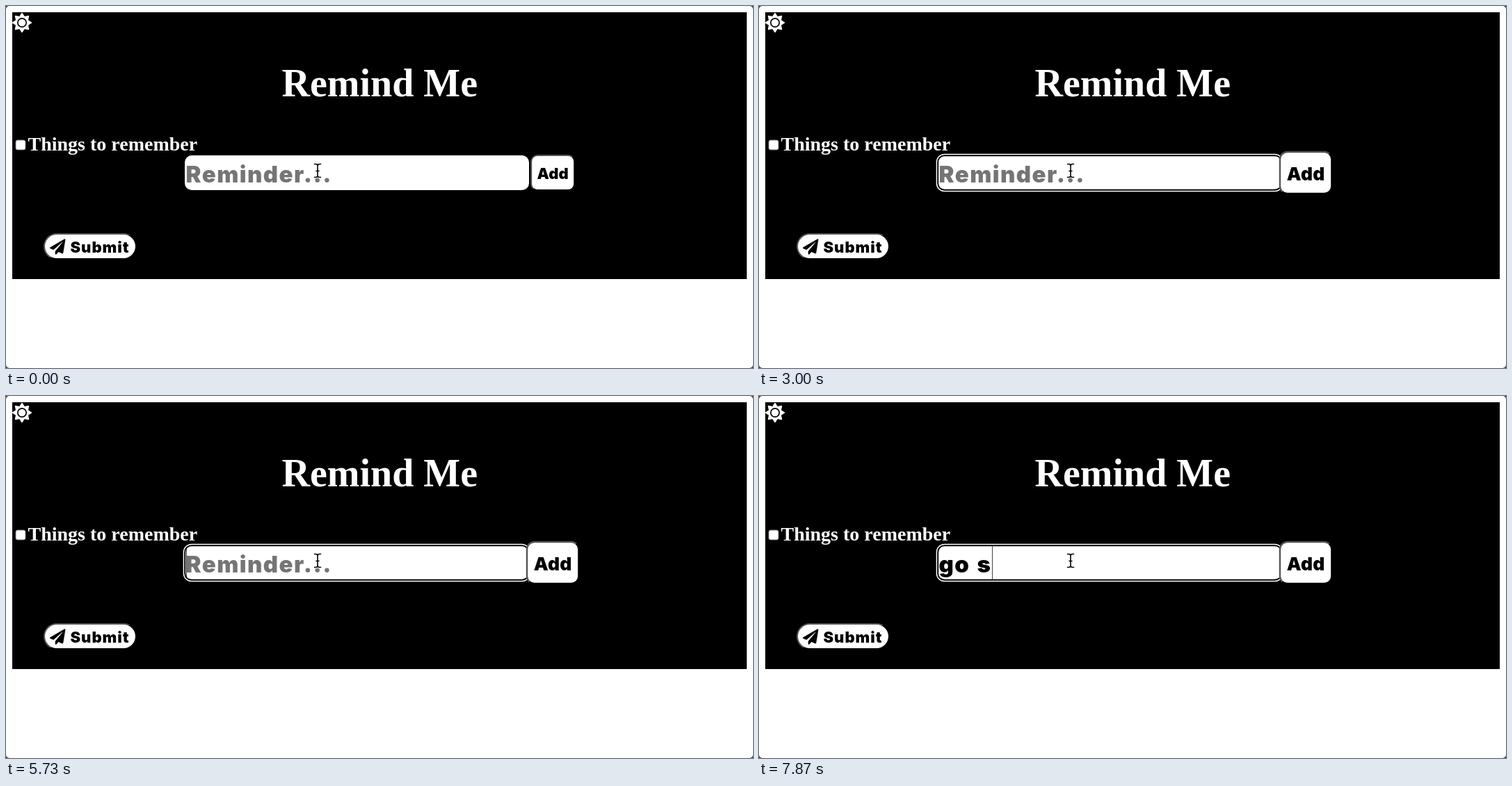
An HTML page that plays this animation: 1074 px wide and 521 px high, repeating every 8 s.

```html
<!DOCTYPE html>
<html lang="en">
<head>
<meta charset="utf-8">
<title>Remind Me</title>
<style>
  html, body { margin: 0; width: 100%; height: 100%; overflow: hidden; background: #444; }
  svg { display: block; width: 1074px; height: 521px; }
  .serif { font-family: "Liberation Serif", serif; font-weight: 700; fill: #fff; }
  .black { font-family: Inter, sans-serif; font-weight: 900; font-optical-sizing: none; white-space: pre; }
  #value { font-size: 33px; letter-spacing: .044em; word-spacing: .06em; }
  .label { font-size: 22px; letter-spacing: .044em; }
  #add .label { letter-spacing: .01em; text-anchor: middle; }
</style>
</head>
<body>
<svg viewBox="0 0 1074 521">
  <defs>
    <linearGradient id="bevel" x2="1" y2="1">
      <stop offset=".5" stop-color="#555"/>
      <stop offset=".5" stop-color="#000"/>
    </linearGradient>
  </defs>

  <rect width="1074" height="521" rx="5" fill="#fff"/>
  <rect x="9" y="9" width="1056" height="384"/>

  <g transform="translate(23 24)">
    <path id="sun" fill="#fff" stroke="#fff" stroke-width="1.8" stroke-linejoin="round"/>
    <circle r="7"/>
    <circle r="5.3" fill="#fff"/>
  </g>

  <text class="serif" x="396.5" y="130" font-size="56">Remind Me</text>
  <rect x="14" y="193" width="14" height="14" rx="2.5" fill="#fff" stroke="#767676"/>
  <text class="serif" x="31.5" y="208" font-size="28">Things to remember</text>

  <rect id="field" x="257" y="215" width="495" height="50" rx="10" fill="#fff"/>
  <g id="ring">
    <rect x="254.7" y="212.7" width="499" height="54.6" rx="12" fill="#fff"/>
    <rect x="256.2" y="214.2" width="496" height="51.6" rx="10.5"/>
    <rect x="258.2" y="216.2" width="492" height="47.6" rx="8.5" fill="#fff"/>
  </g>
  <text id="value" class="black" x="258.5" y="254"></text>
  <rect id="caret" width="1" fill="#444"/>

  <g id="add">
    <rect x="-32" y="-26" width="64" height="52" rx="10" fill="url(#bevel)"/>
    <rect x="-30" y="-24" width="60" height="48" rx="8" fill="#fff"/>
    <text class="black label" y="9">Add</text>
  </g>

  <rect x="54" y="327" width="134" height="38" rx="19" fill="url(#bevel)"/>
  <rect x="56" y="329" width="130" height="34" rx="17" fill="#fff"/>
  <path transform="translate(63 335.3) scale(.0437)" d="M476 3 12 271c-18 10-16 35 2 43l107 44 287-253c6-5 14 3 9 8L176 407v80c0 24 28 33 42 16l64-77 125 52c14 6 30-3 33-18l72-432c3-20-19-35-36-25z"/>
  <text class="black label" x="92.5" y="355">Submit</text>

  <g fill="none" stroke-linecap="round">
    <path id="halo" stroke="#fff" stroke-width="3.4" stroke-opacity=".7"/>
    <path id="beam" stroke="#000" stroke-width="1.6"/>
  </g>
</svg>
<script>
  const LOOP = 8000, HINT = "Reminder...";
  const $ = id => document.getElementById(id);

  // [start ms, typed text (null shows the hint), caret x (0 hides it)]
  const steps = [
    [0, null, 0], [330, null, 259], [870, null, 0], [1400, null, 259],
    [1930, null, 0], [2470, null, 259], [3000, null, 0],
    [3470, "f", 272], [3600, "fo", 294], [4130, "fo", 0], [4270, "f", 0],
    [4670, "", 259], [4800, null, 259], [5200, null, 0], [5730, null, 259],
    [6200, "g", 281], [6330, "go", 304], [6870, "go ", 315], [7330, "go ", 0],
    [7870, "go s", 335]
  ];

  const star = Array.from({ length: 16 }, (_, i) => {
    const r = i % 2 ? 8.7 : 13.2, a = i * Math.PI / 8;
    return `${(r * Math.cos(a)).toFixed(2)} ${(r * Math.sin(a)).toFixed(2)}`;
  });
  $("sun").setAttribute("d", `M${star.join("L")}Z`);

  const beam = "M443.5 227.5h2q2.5 0 2.5 2.5q0-2.5 2.5-2.5h2M448 230v14" +
    "M443.5 246.5h2q2.5 0 2.5-2.5q0 2.5 2.5 2.5h2M446 237.5h4";
  for (const id of ["halo", "beam"]) $(id).setAttribute("d", beam);

  let shown = null;

  function draw(t) {
    const step = steps.findLast(s => s[0] <= t);
    const scale = t < 330 ? 1 : t < 400 ? 1.1 : 1.2;
    $("add").setAttribute("transform", `translate(786.2 240) scale(${scale})`);
    if (step === shown) return;
    shown = step;

    const [, text, x] = step;
    const hint = text === null;
    $("ring").style.display = t < 330 ? "none" : "";
    $("field").style.display = t < 330 ? "" : "none";
    $("value").textContent = hint ? HINT : text;
    $("value").setAttribute("fill", hint ? "#757575" : "#000");
    $("caret").style.display = x ? "" : "none";
    $("caret").setAttribute("x", x);
    $("caret").setAttribute("y", hint ? 220 : 216);
    $("caret").setAttribute("height", hint ? 40 : 48);
  }

  const start = performance.now();
  function tick() {
    draw((performance.now() - start) % LOOP);
    requestAnimationFrame(tick);
  }
  tick();
</script>
</body>
</html>
```
